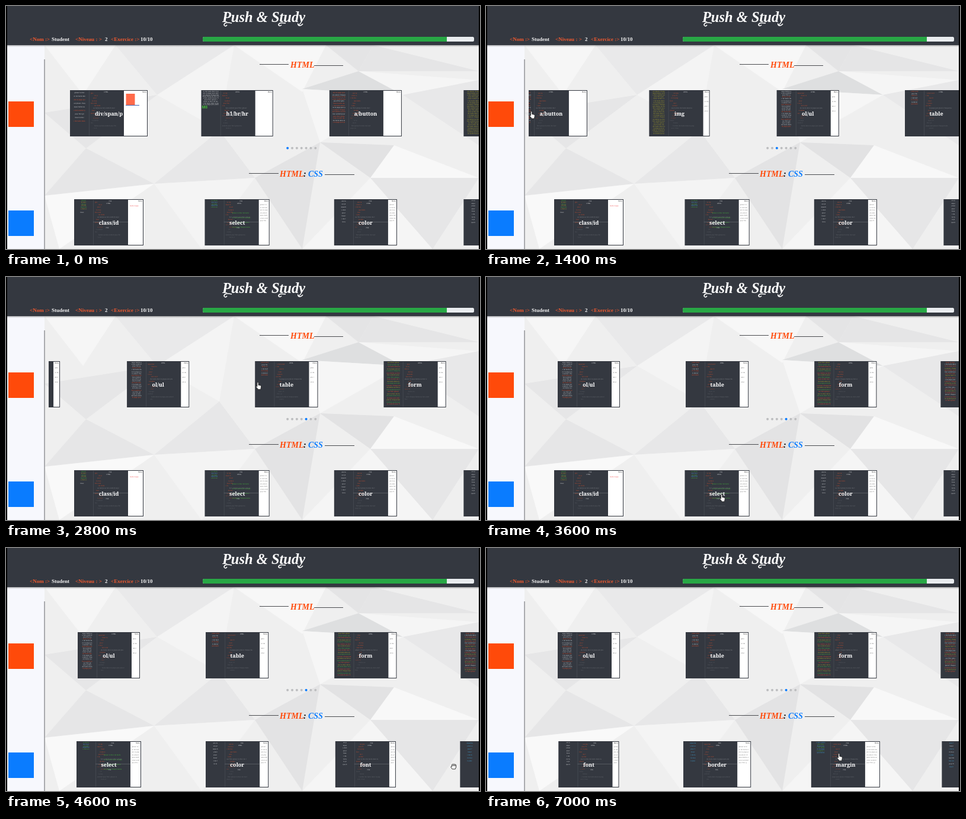
Write an HTML page that moves like this. It is 800x410 px and loops after 7.1 s.

```html
<!DOCTYPE html>
<html lang="fr">
<head>
<meta charset="utf-8">
<title>Push &amp; Study</title>
<style>
  html, body { margin: 0; width: 100%; height: 100%; overflow: hidden; background: #000; }
  svg { display: block; width: 100%; height: 100%; }
  .script { font: italic bold 14px "Liberation Serif", serif; }
  .info { font: bold 9px "Liberation Serif", serif; fill: #f2f2f2; }
  .label { font: bold 9px "Noto Serif", serif; fill: #fff; text-anchor: middle; }
  .tiny { font: 2.5px "DejaVu Sans", sans-serif; }
  .orange { fill: #ff4a0a; }
  .blue { fill: #0a7cff; }
</style>
</head>
<body>
<svg id="stage" viewBox="0 0 800 410">
  <defs>
    <clipPath id="view"><rect x="72" y="66" width="726" height="344"/></clipPath>
    <linearGradient id="shade" x2="0" y2="1">
      <stop stop-color="#000" stop-opacity=".3"/><stop offset="1" stop-color="#000" stop-opacity="0"/>
    </linearGradient>
  </defs>
  <rect x="2" width="796" height="410" fill="#efefef"/>
  <g id="facets"></g>
  <rect x="2" y="66" width="63" height="344" fill="#f7f8fd"/>
  <path d="M65 90V410" stroke="#606367"/>
  <rect class="orange" x="4" y="161" width="43" height="43"/>
  <rect class="blue" x="4" y="345" width="43" height="43"/>

  <rect x="2" width="796" height="66" fill="#343840"/>
  <rect x="2" y="66" width="796" height="3" fill="url(#shade)"/>
  <text class="script" x="435" y="27" text-anchor="middle" fill="#fff" style="font-size:24.5px">Push &amp; Study</text>
  <path d="M381 29q-12-3-13 3q2 4 5 0M472 29q-12-2-12 3q2 3 5 0M493 32q4 3 8-2" fill="none" stroke="#fff" stroke-width="1.6"/>
  <g id="info"></g>
  <rect x="332" y="52" width="458" height="8" rx="2.5" fill="#e9ecef"/>
  <path d="M744 52H334.500a2.500 2.500 0 0 0-2.500 2.500v3a2.500 2.500 0 0 0 2.500 2.500H744z" fill="#28a745"/>

  <path d="M428 98.500h49M520 100.500h49M410 282.500h50M538 284.500h50" stroke="#4a4c50"/>
  <text class="script orange" x="480" y="104">HTML</text>
  <text class="script orange" x="462" y="288">HTML</text>
  <text class="script" x="502" y="288">:</text>
  <text class="script blue" x="510" y="288">CSS</text>
  <g id="dots"></g>
  <g clip-path="url(#view)"><g id="row0"></g><g id="row1"></g></g>
  <g id="cursor" fill="#fff" stroke="#222" stroke-width=".9" stroke-linejoin="round">
    <path d="M-2.500 1V-5.500q1.300-1.500 2.300 0V-1.500l3.200.6q1.700.4 1.400 2.200L3.700 4.500V6H-1.500V4.800L-4.500 1.400q.4-1.400 2-.4z"/>
    <path d="M-2.500 1V-2.500q1-1.300 1.800-.3q1-1.300 1.900 0q1-.9 1.800.2q1.200-.5 1.500.8V2L3.200 5H-1.800L-4.300 1.500q.3-1.400 1.800-.5zM-.7-2.500V0M1.200-2.400V0M3-2V0"/>
    <path d="M-4-6V5l2.600-2.300L.3 6.500 2 5.700.5 2.200H4z"/>
  </g>
</svg>
<script>
const LOOP = 7100, PITCH = 216.700, FIRST = 173.500, CARD_H = 78, EDITOR_W = 91;
const ROW_TOP = [142, 326];
const $ = id => document.getElementById(id);

function add(parent, tag, attrs, text) {
  const node = document.createElementNS("http://www.w3.org/2000/svg", tag);
  for (const name in attrs) node.setAttribute(name, attrs[name]);
  if (text) node.textContent = text;
  return parent.appendChild(node);
}

// Low-poly backdrop: fill, then polygon corners.
[
  "#f6f6f6 65,66 185,66 130,150", "#e9e9ea 185,66 385,66 255,150",
  "#f4f4f4 255,150 385,66 360,210", "#e6e6e7 65,180 255,150 135,240",
  "#f7f7f7 385,66 540,66 500,145", "#e4e4e5 540,66 620,66 595,110",
  "#dedfe0 500,140 595,110 670,150", "#e5e5e6 620,66 798,110 595,110",
  "#f5f5f5 595,110 798,125 670,150", "#e8e8e9 670,150 798,125 798,235",
  "#f6f6f6 500,140 670,150 530,230", "#e2e2e3 530,230 655,235 615,290",
  "#f8f8f8 655,235 798,290 615,290", "#e6e6e7 65,320 135,240 250,300",
  "#f9f9f9 65,320 250,300 90,410", "#e7e7e8 250,300 360,210 420,290",
  "#f4f4f4 250,300 420,290 330,410", "#e3e3e4 420,290 530,230 500,410",
  "#f5f5f5 615,290 720,410 500,410", "#e6e6e7 615,290 798,290 720,410"
].forEach(row => {
  const [fill, ...points] = row.split(" ");
  add($("facets"), "polygon", { fill, points: points.join(" ") });
});

[[40, "<Nom :>"], [77, "Student"], [117, "<Niveau : >"], [167, "2"], [177, "<Exercice :>"], [227, "10/10"]]
  .forEach(([x, text]) => add($("info"), "text",
    { class: "info", x, y: 59, style: text[0] === "<" ? "fill:#f0592f" : "" }, text));

const dots = Array.from({ length: 7 }, (_, i) =>
  add($("dots"), "circle", { cx: 475.200 + i * 7.850, cy: 239.800, r: 2 }));

const RED = "#e8512e", WHITE = "#d8dadc", YELLOW = "#b5ad25", GREEN = "#45b83a", SKY = "#41a5d8";
// label, width, side-column colours, first line y, line count, line step, characters per line
const rows = [[
  ["div/span/p", 131, [WHITE, WHITE, RED], 5, 9, 6, 15],
  ["h1/br/hr", 121, [WHITE], 3, 9, 2.800, 22],
  ["a/button", 122, [RED, WHITE, RED], 5, 15, 3.600, 19],
  ["img", 102, [YELLOW], 3, 24, 3.100, 19],
  ["ol/ul", 105, [WHITE, WHITE, WHITE, RED], 3, 20, 3.100, 17],
  ["table", 106, [RED, WHITE], 3, 7, 3.500, 9],
  ["form", 105, [YELLOW, GREEN, RED], 3, 21, 3.500, 19],
  ["input", 112, [RED, WHITE, RED, YELLOW], 3, 21, 3.200, 17]
], [
  ["class/id", 117, [GREEN, YELLOW], 3, 6, 2.800, 7],
  ["select", 109, [GREEN, SKY], 3, 5, 2.800, 9],
  ["color", 106, [WHITE], 4, 8, 5, 8],
  ["font", 102, [WHITE], 3, 9, 4.600, 8],
  ["border", 114, [SKY], 4, 7, 5, 11],
  ["margin", 116, [SKY, GREEN], 3, 7, 2.800, 11],
  ["padding", 108, [SKY, WHITE], 4, 9, 5, 8]
]];

const FILLER = "glisser le bloc de texte dans la page puis placer chaque balise au bon endroit pour finir ";
const words = (seed, length) => (FILLER + FILLER).substr(seed * 13 % FILLER.length, length).trim() || "div";

function drawCard(row, index, [label, width, colors, first, count, step, chars]) {
  const card = add($("row" + row), "g",
    { transform: `translate(${FIRST + index * PITCH - width / 2} ${ROW_TOP[row]})` });
  const tiny = (x, y, fill, text, more) => add(card, "text", { class: "tiny", x, y, fill, ...more }, text);
  const middle = { "text-anchor": "middle" };

  add(card, "rect", { width, height: CARD_H, fill: "#fff" });
  add(card, "rect", { width: EDITOR_W, height: CARD_H, fill: "#343840" });
  add(card, "path", { d: `M32.500 0V${CARD_H}`, stroke: "#50545b", "stroke-width": .6 });

  for (let k = 0; k < count; k++)
    tiny(16, first + k * step, colors[k % colors.length],
      words(k + index, chars - (k * 5 + index) % 5), middle);

  for (let k = 0; k < 15; k++) {
    const long = k % 7 === 6;
    tiny(35 + (k * 3 + index) % 4 * 2, 6 + k * 4.200, long ? "#8b8f94" : k < 11 ? "#d3502f" : "#74787e",
      words(k * 3 + index, long ? 30 : 4 + (k * 7 + index) % 6), { opacity: k < 9 ? .9 : .55 });
  }
  tiny(61, 3.500, WHITE, row ? "CSS" : "HTML", middle);
  tiny(width - 2, 4, "#222", "Menu", { "text-anchor": "end", "font-weight": "bold" });

  if (row) {
    tiny(58, 8, WHITE, "HTML", middle);
    tiny(56, 49, WHITE, "CSS", middle);
    add(card, "path", { d: "M32 38.500H91", stroke: "#777b80", "stroke-width": .5 });
    for (let k = 0; k < 7 && index; k++)
      tiny(EDITOR_W + 2, 10 + k * 4.500, "#777", words(k, (width - EDITOR_W) / 1.700));
    if (!index) {
      tiny(EDITOR_W + 3, 12, "#ef4444", "texte rouge");
      tiny(10, 23, WHITE, "class");
    }
    if (index === 1) for (let k = 0; k < 4; k++) tiny(46, 24 + k * 8, GREEN, words(k, 24));
  } else if (index === 0) {
    add(card, "path", { d: "M94.500 6h15v19h-15z", fill: "#ff6a4a" });
    add(card, "path", { d: "M94 25.500h23", stroke: "#3c64b4" });
  } else if (index === 1) {
    add(card, "text", { x: 1, y: 31, fill: GREEN, style: "font:bold 6px Inter,sans-serif" }, "M8");
  } else if (index > 2) {
    for (let k = 0; k < 4; k++) tiny(EDITOR_W + 2, 12 + k * 8, "#666", words(k, 5));
  }
  add(card, "rect", { x: .5, y: .5, width: width - 1, height: CARD_H - 1, fill: "none", stroke: "#343840" });
  add(card, "text", { class: "label", x: width / 2, y: 43 }, label);
}
rows.forEach((cards, row) => cards.forEach((card, index) => drawCard(row, index, card)));

// Keys: time, then values; motion eases in and out between them.
const scrollKeys = [
  [[800, 0], [1400, -497], [1500, -497], [1800, -2 * PITCH], [2450, -2 * PITCH], [2950, -880], [3250, -4 * PITCH]],
  [[3650, 0], [4000, -209], [4200, -PITCH], [4650, -PITCH], [5150, -704.700], [5400, -3 * PITCH]]
];
const cursorKeys = [
  [0, 640, 425], [100, 640, 425], [600, 575, 183], [800, 575, 183], [1400, 78, 184], [1500, 78, 184],
  [2250, 776, 183], [2450, 776, 183], [2950, 330, 184], [3050, 330, 184], [3550, 399, 373],
  [3650, 399, 373], [4000, 190, 370], [4100, 190, 370], [4550, 755, 368], [4650, 755, 368],
  [5150, 267, 368], [5700, 267, 368], [6250, 597, 353]
];

function sample(keys, time) {
  const next = keys.findIndex(key => key[0] > time);
  if (next === 0) return keys[0].slice(1);
  if (next < 0) return keys[keys.length - 1].slice(1);
  const a = keys[next - 1], b = keys[next];
  const p = (time - a[0]) / (b[0] - a[0]), eased = p * p * (3 - 2 * p);
  return a.slice(1).map((v, i) => v + (b[i + 1] - v) * eased);
}

// 0 pointing hand over a card, 1 grabbing hand in a row, 2 arrow elsewhere
function cursorShape(x, y, scroll) {
  const row = ROW_TOP.findIndex(top => y >= top && y <= top + CARD_H);
  if (row < 0) return 2;
  const overCard = rows[row].some(([, width], i) =>
    Math.abs(x - FIRST - i * PITCH - scroll[row]) <= width / 2);
  return overCard ? 0 : 1;
}

function draw() {
  const time = Math.floor(performance.now() % LOOP / 100) * 100;
  const scroll = scrollKeys.map(keys => sample(keys, time)[0]);
  scroll.forEach((x, row) => $("row" + row).setAttribute("transform", `translate(${x})`));

  const active = Math.round(-scroll[0] / PITCH);
  dots.forEach((dot, i) => dot.setAttribute("fill", i === active ? "#0a7cff" : "#bcbdbf"));

  const [x, y] = sample(cursorKeys, time), shape = cursorShape(x, y, scroll);
  $("cursor").setAttribute("transform", `translate(${x} ${y})`);
  [...$("cursor").children].forEach((path, i) => path.setAttribute("display", i === shape ? "inline" : "none"));
  requestAnimationFrame(draw);
}
draw();
</script>
</body>
</html>
```
